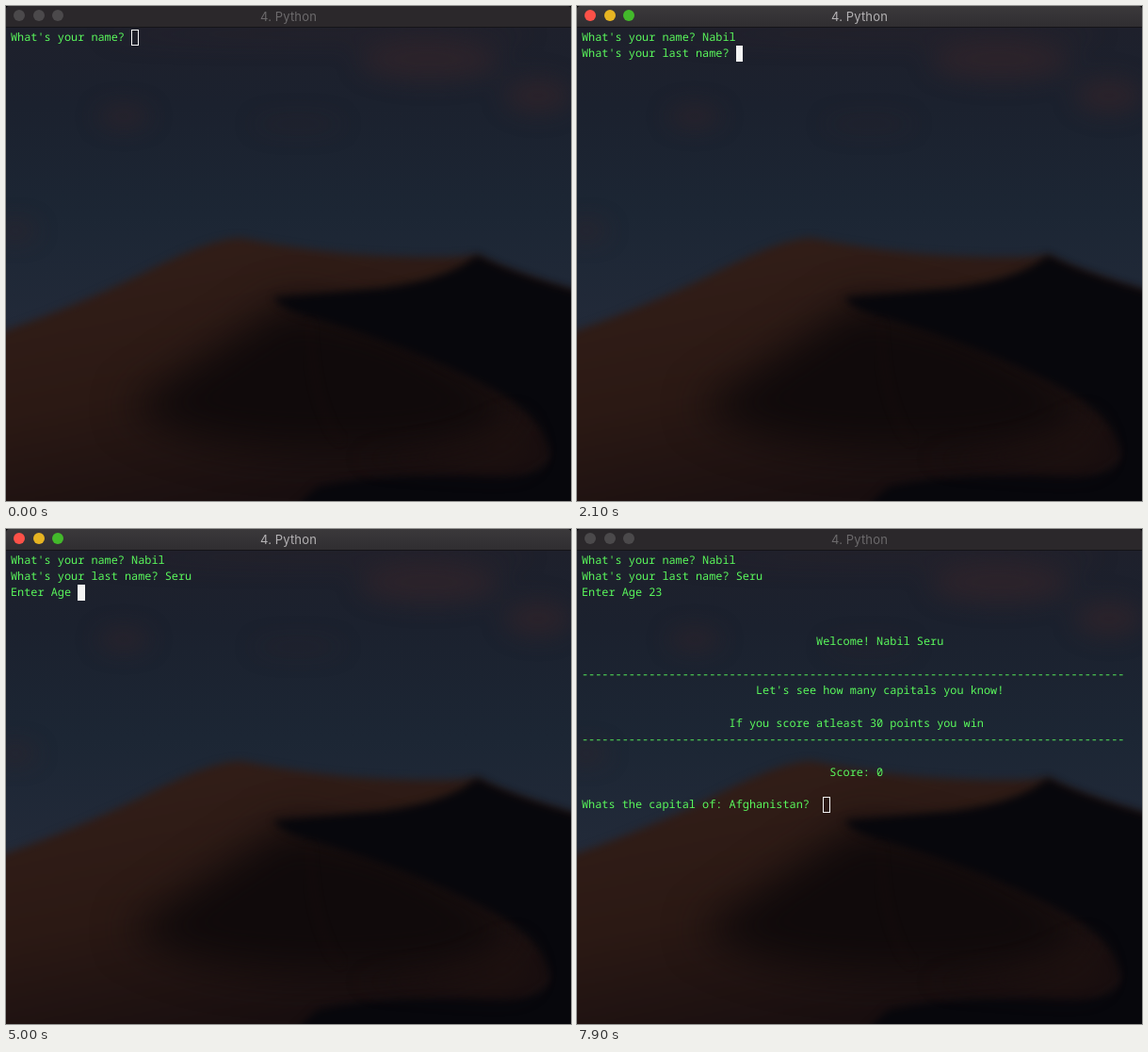
An HTML page that plays this animation: 600x525 px, repeating every 8 s.

```html
<!DOCTYPE html>
<html lang="en">
<head>
<meta charset="utf-8">
<title>Terminal quiz</title>
<style>
  html, body { margin: 0; width: 100%; height: 100%; overflow: hidden; background: #000; }
  #window { position: relative; width: 600px; height: 525px; overflow: hidden; border-radius: 4px 4px 0 0; }
  #window > * { position: absolute; left: 0; top: 0; }
  filter { color-interpolation-filters: sRGB; }
  #bar {
    width: 600px; height: 22px; border-bottom: 1px solid #151418;
    background: #2b282b; color: #6c6a6c;
    font: 13px/22px Inter, sans-serif; text-align: center; letter-spacing: .15px;
  }
  #bar i { position: absolute; top: 4px; width: 12px; height: 12px; border-radius: 50%; background: #4b494b; }
  .active #bar { background: linear-gradient(#3b393b, #302e31); color: #b5b3b5; }
  .active #bar i { background: var(--c); }
  #screen {
    margin: 0; left: 5px !important; top: 24.5px !important;
    font: 11.87px/17.32px "Noto Sans Mono", monospace;
    color: #5af85c; white-space: pre; text-rendering: geometricPrecision;
  }
  #cursor {
    display: inline-block; vertical-align: top; width: 1.05ch; height: 17.3px;
    box-shadow: inset 0 0 0 1px #f4f4f4;
  }
  .active #cursor { background: #f4f4f4; }
</style>
</head>
<body>
<div id="window">
  <svg width="600" height="525">
    <defs>
      <linearGradient id="sky" x2="0" y2="1">
        <stop offset="0" stop-color="#1f202b"/>
        <stop offset=".2" stop-color="#1b212e"/>
        <stop offset=".42" stop-color="#1c2634"/>
        <stop offset=".65" stop-color="#222a39"/>
      </linearGradient>
      <linearGradient id="sand" gradientUnits="userSpaceOnUse" x1="200" y1="246" x2="260" y2="525">
        <stop offset="0" stop-color="#321e18"/>
        <stop offset=".5" stop-color="#2b1914"/>
        <stop offset="1" stop-color="#190f10"/>
      </linearGradient>
      <filter id="soft" x="-20%" y="-20%" width="140%" height="140%"><feGaussianBlur stdDeviation="4"/></filter>
      <filter id="haze" x="-60%" y="-100%" width="220%" height="300%"><feGaussianBlur stdDeviation="13"/></filter>
      <filter id="shade" x="-30%" y="-60%" width="160%" height="220%"><feGaussianBlur stdDeviation="22"/></filter>
    </defs>
    <rect width="600" height="525" fill="url(#sky)"/>
    <g filter="url(#haze)" fill="#32242a" opacity=".75">
      <ellipse cx="450" cy="58" rx="75" ry="20"/>
      <ellipse cx="565" cy="95" rx="36" ry="18"/>
      <ellipse cx="125" cy="117" rx="28" ry="10"/>
      <ellipse cx="310" cy="125" rx="50" ry="8" opacity=".4"/>
      <ellipse cx="10" cy="238" rx="22" ry="8"/>
      <ellipse cx="330" cy="30" rx="230" ry="8" opacity=".5"/>
    </g>
    <path filter="url(#soft)" fill="url(#sand)" d="M-30 356 L0 344 Q90 312 160 276 Q225 244 250 246 Q330 262 400 265 T500 264 Q540 286 640 312 V560 H-30Z"/>
    <path filter="url(#shade)" fill="#100a0b" d="M300 312 Q220 365 130 425 Q200 480 400 470 Q520 460 540 430 Q500 380 400 335Z"/>
    <path filter="url(#soft)" fill="#07070c" d="M500 264 Q470 290 400 299 Q340 304 284 309 Q290 322 330 332 Q440 365 520 408 Q575 440 578 478 Q572 499 520 499 Q400 494 330 510 L280 560 H640 V312 Q540 286 500 264Z"/>
    <path filter="url(#haze)" fill="#20120f" opacity=".5" d="M370 480 Q480 475 540 435 Q585 490 520 490Z"/>
    <path filter="url(#soft)" fill="none" stroke="#1f110e" stroke-width="3" opacity=".5" d="M322 335 Q326 430 356 462"/>
  </svg>
  <div id="bar">
    <i style="left:8px;--c:#fc5148"></i><i style="left:28.5px;--c:#e6b422"></i><i style="left:49px;--c:#43b92b"></i>
    4. Python
  </div>
  <pre id="screen"><span id="text"></span><span id="cursor"></span></pre>
</div>
<script>
const LOOP = 8000, FOCUS = 200, BLUR = 7400;
const rule = "-".repeat(81);
const indent = (columns, line) => " ".repeat(columns) + line;

const welcome = [
  "", "",
  indent(35, "Welcome! Nabil Seru"),
  "", rule,
  indent(26, "Let's see how many capitals you know!"),
  "",
  indent(22, "If you score atleast 30 points you win"),
  rule, "",
  indent(37, "Score: 0"),
  "",
  "Whats the capital of: Afghanistan?  "
].join("\n");

// Each entry is appended to the screen at its time in ms.
const output = [
  [0, "What's your name? "],
  [1400, "Na"], [1500, "b"], [1600, "i"], [1700, "l"],
  [1800, "\nWhat's your last name? "],
  [3100, "S"], [3200, "e"], [3300, "r"], [3400, "u"],
  [4000, "\nEnter Age "],
  [5300, "2"], [5400, "3"],
  [6100, "\n" + welcome]
];

const win = document.getElementById("window");
const text = document.getElementById("text");

function draw() {
  const t = performance.now() % LOOP;
  const shown = output.filter(([at]) => at <= t).map(([, part]) => part).join("");
  if (text.textContent !== shown) text.textContent = shown;
  win.classList.toggle("active", t >= FOCUS && t < BLUR);
  requestAnimationFrame(draw);
}
draw();
</script>
</body>
</html>
```
